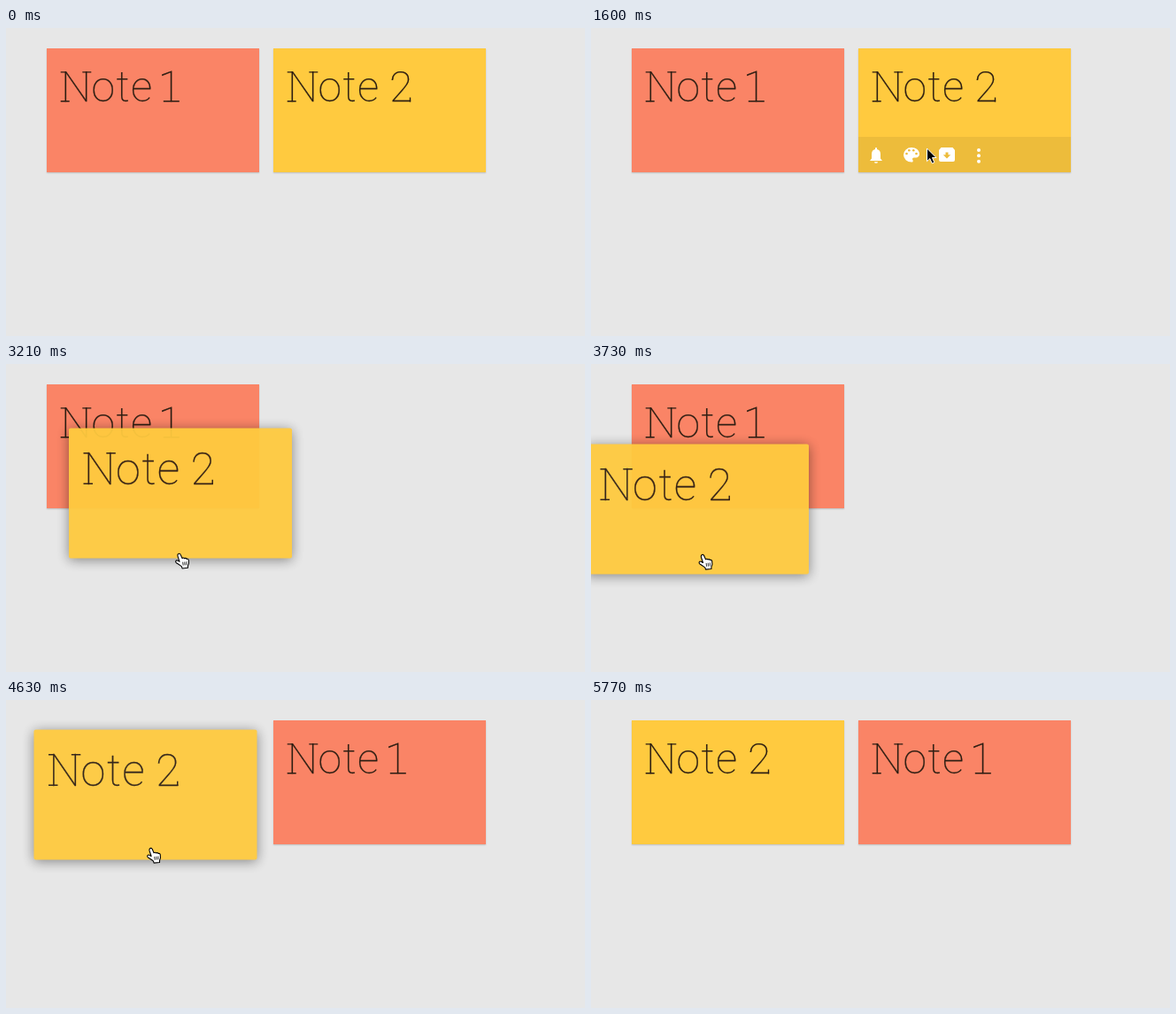
Animation of 654 by 348 pixels, one loop 6.03 s. Source, as an HTML page:

```html
<!DOCTYPE html>
<html lang="en">
<head>
<meta charset="utf-8">
<title>Swapping notes</title>
<style>
html, body { margin: 0; width: 100%; height: 100%; overflow: hidden; background: #e7e7e7; }
.card {
  position: absolute; left: 0; top: 0; width: 240px; height: 140px;
  box-shadow: 0 1px 1.5px rgba(0, 0, 0, .18);
}
.card.lifted { border-radius: 2px; box-shadow: 0 2px 13px rgba(0, 0, 0, .45); }
#one { background: #fa8466; }
#two { background: #ffca3f; }
svg { position: absolute; left: 0; top: 0; width: 100%; height: 100%; overflow: hidden; }
text {
  font: 100 48px Roboto, "Open Sans", sans-serif;
  fill: #2b1d12; stroke: #2b1d12; stroke-width: .25px;
}
.slab { fill: none; stroke: #2b1d12; stroke-width: 1.4; }
#tools { fill: #fff; }
#tools .hole { fill: #edbc3b; }
</style>
</head>
<body>
<div class="card" id="one"><svg><text y="60.4">Note 1</text><path class="slab"/></svg></div>
<div class="card" id="two"><svg>
  <g id="tools">
    <rect y="100" width="240" height="40" fill="#000" opacity=".07"/>
    <path d="M13 127h14l-2-2.5v-5a5 5.5 0 0 0-4-5.4v-1a1 1 0 0 0-2 0v1a5 5.5 0 0 0-4 5.4v5zM18 128.2h4a2 1.6 0 0 1-4 0z"/>
    <path d="M60 112a9 8.3 0 0 0 0 16.6c2 0 2-1.8 1.3-2.7s0-2.4 1.5-2.4h2a4 4 0 0 0 4.2-4.2c0-4.2-4-7.3-9-7.3z"/>
    <g class="hole">
      <circle cx="54.5" cy="119" r="1.3"/><circle cx="57.3" cy="115.3" r="1.3"/>
      <circle cx="62.3" cy="115.3" r="1.3"/><circle cx="65.5" cy="119" r="1.3"/>
    </g>
    <path d="M93.5 112h13l2.5 3h-18zM91 115h18v11a2 2 0 0 1-2 2h-14a2 2 0 0 1-2-2z"/>
    <path class="hole" d="M98.5 117.5h3v2.7h2.7l-4.2 4.2-4.2-4.2h2.7z"/>
    <circle cx="136" cy="115" r="2"/><circle cx="136" cy="121.3" r="2"/><circle cx="136" cy="127.7" r="2"/>
  </g>
  <text y="60.4">Note 2</text><path class="slab"/>
</svg></div>
<svg id="pointer">
  <path id="arrow" fill="#000" stroke="#fff" d="M.5 .5V15.2L3.8 12L6.2 17.4L8.8 16.3L6.5 11H11Z"/>
  <g id="hand" stroke="#000" stroke-width="1.1" stroke-linejoin="round">
    <path fill="#fff" d="M-2.4 1.2C-1.4 0 0 .4 .4 1.4L2.4 5.8C3.2 5 4.5 5.2 4.9 6.1C5.7 5.3 7 5.6 7.3 6.6C8.4 6.1 9.4 6.7 9.6 8L9.8 11.4L8.8 14.4V16.6L2.4 17.2L1.8 15.2C0 13.6-2.2 12.4-4.2 11C-6 9.6-4.6 7.6-2.8 8.3L-.6 9.6L-2.6 3.6C-2.9 2.6-2.9 1.8-2.4 1.2Z"/>
    <path fill="none" stroke-width=".8" d="M3 10l.5 3.8M5.1 9.8l.3 3.8M7.2 9.6l.1 3.8"/>
  </g>
</svg>
<script>
const LOOP = 6030, START = 802, BEAT = 88.6;   // the picture moves in beats
const GRAB = 21, DROP = 46;
const GRIP = [5, 60], LEAD = .3;               // the pointer runs slightly ahead of the card
const $ = id => document.getElementById(id);
const clamp = v => Math.max(0, Math.min(1, v));
const smooth = v => clamp(v) ** 2 * (3 - 2 * clamp(v));

// Key points: beat, x, y
const hover = [[0, 364, 291], [4, 318, 174], [5, 318, 174], [9, 379, 135.5], [11, 379, 135.5], [14, 432, 144]];
const drag = [
  [21, 414.5, 98], [26, 208, 136], [27, 197, 146], [31, 122, 254], [33, 120, 164],
  [35, 140, 122], [38, 130, 80], [40, 118, 85], [43, 157.5, 107], [46, 166, 93]
];
const leave = [[46, 172, 155], [53, 533, 311], [55, 604, 345]];

// Cubic path through key points; flow 0 stops at each point, 1 passes through
function along(keys, beat, flow) {
  const last = keys.length - 1;
  const t = Math.max(keys[0][0], Math.min(keys[last][0], beat));
  const i = Math.max(0, keys.findIndex(key => key[0] >= t) - 1);
  const a = keys[i], b = keys[i + 1], span = b[0] - a[0];
  const k = (t - a[0]) / span;
  const slope = (n, axis) => n === 0 || n === last ? 0
    : flow * (keys[n + 1][axis] - keys[n - 1][axis]) / (keys[n + 1][0] - keys[n - 1][0]);
  return [1, 2].map(axis =>
    a[axis] + (b[axis] - a[axis]) * smooth(k)
    + span * k * (1 - k) * ((1 - k) * slope(i, axis) - k * slope(i + 1, axis)));
}

// Centre each letter's ink on its spot, then add the slab serifs
function setTitle(card) {
  const label = card.querySelector('text');
  const style = getComputedStyle(label);
  const pen = document.createElement('canvas').getContext('2d');
  pen.font = `${style.fontWeight} ${style.fontSize} ${style.fontFamily}`;
  const ink = ch => {
    const m = pen.measureText(ch);
    return { left: m.actualBoundingBoxLeft, right: m.actualBoundingBoxRight };
  };
  const centred = (ch, x) => x + (ink(ch).left - ink(ch).right) / 2;
  const digit = label.textContent[5];
  const digitX = digit === '1' ? 141.8 - ink('1').right : centred('2', 144);
  const xs = [centred('N', 33), centred('o', 64), centred('t', 85.5), centred('e', 107.5), 122, digitX];
  label.setAttribute('x', xs.join(' '));

  const half = (ink('N').left + ink('N').right) / 2 - .7;
  const a = 33 - half, b = 33 + half;
  const foot = digit === '1' ? 'M131.8 59.8h18' : `M${digitX + ink('2').right - .5} 60.4v-5`;
  card.querySelector('.slab').setAttribute('d',
    `M${a - 5} 26.9h5.5M${a - 5} 59.8h10M${b - 5} 26.9h10${foot}`);
}

function draw(now) {
  const beat = Math.floor((now % LOOP - START) / BEAT);
  const held = beat >= GRAB && beat <= DROP;
  const lift = clamp(Math.min(beat - GRAB + .1, DROP + .1 - beat) / 2);

  $('one').style.transform = `translate(${46 + 256 * smooth((beat - 34) / 4)}px, 23px)`;

  const [cx, cy] = held ? along(drag, beat, 1) : [beat < GRAB ? 422 : 166, 93];
  const two = $('two');
  two.style.transform = `translate(${cx - 120}px, ${cy - 70}px) scale(${1 + .05 * lift})`;
  two.style.opacity = 1 - .05 * lift;
  two.classList.toggle('lifted', held);
  $('tools').style.opacity = beat < GRAB ? clamp((beat - 5) / 4) : 0;

  const [px, py] = held ? along(drag, beat + LEAD, 1).map((v, axis) => v + GRIP[axis])
    : beat < GRAB ? along(hover, beat, 0) : along(leave, beat, 1);
  const icon = held ? 'hand' : 'arrow';
  $('pointer').style.display = beat >= 0 && beat <= 55 ? '' : 'none';
  for (const id of ['arrow', 'hand']) $(id).style.display = id === icon ? '' : 'none';
  $(icon).setAttribute('transform', `translate(${px} ${py})`);
}

function loop() {
  draw(performance.now());
  requestAnimationFrame(loop);
}

[$('one'), $('two')].forEach(setTitle);
loop();
</script>
</body>
</html>
```
